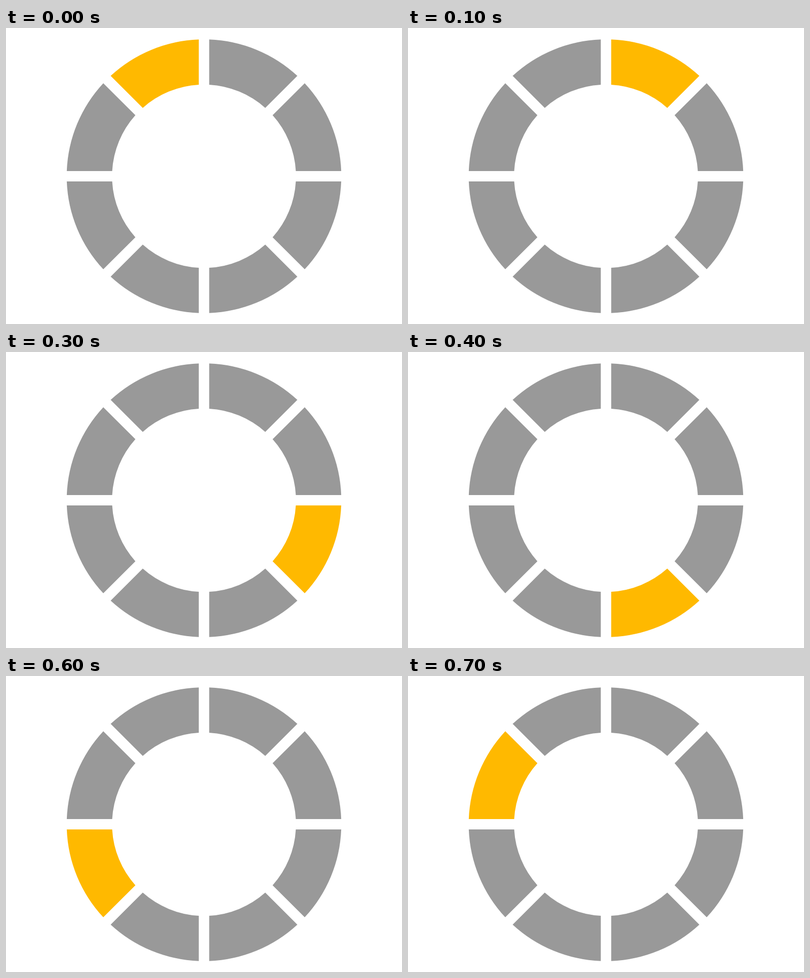
These frames come from a looping animation (800x600 px, 0.8 s). An HTML page with a canvas:

```html
<!DOCTYPE html>
<html lang="en">
<head>
<meta charset="utf-8">
<title>Segmented spinner</title>
<style>
  html, body { margin: 0; width: 100%; height: 100%; overflow: hidden; background: #fff; }
  canvas { display: block; }
</style>
</head>
<body>
<canvas id="stage" width="800" height="600"></canvas>
<script>
const ctx = document.getElementById('stage').getContext('2d');
const CX = 400, CY = 300.5;
const OUTER = 277.4, INNER = 185.8;
const HALF_GAP = 10.5;
const COUNT = 8, STEP_MS = 100;
const GREY = '#999999', AMBER = '#ffb900';

// Ring segment whose straight sides run parallel to the spokes.
function segment(i) {
  const from = -Math.PI * 0.75 + i * Math.PI / 4;
  const to = from + Math.PI / 4;
  const outerPad = Math.asin(HALF_GAP / OUTER);
  const innerPad = Math.asin(HALF_GAP / INNER);
  const path = new Path2D();
  path.arc(CX, CY, OUTER, from + outerPad, to - outerPad);
  path.arc(CX, CY, INNER, to - innerPad, from + innerPad, true);
  path.closePath();
  return path;
}

const segments = Array.from({ length: COUNT }, (_, i) => segment(i));
let start = null;

function draw(ms) {
  const active = Math.floor(ms / STEP_MS) % COUNT;
  ctx.fillStyle = '#fff';
  ctx.fillRect(0, 0, 800, 600);
  segments.forEach((path, i) => {
    ctx.fillStyle = i === active ? AMBER : GREY;
    ctx.fill(path);
  });
}

function tick(now) {
  if (start === null) start = now;
  draw(now - start);
  requestAnimationFrame(tick);
}

draw(0);
requestAnimationFrame(tick);
</script>
</body>
</html>
```
